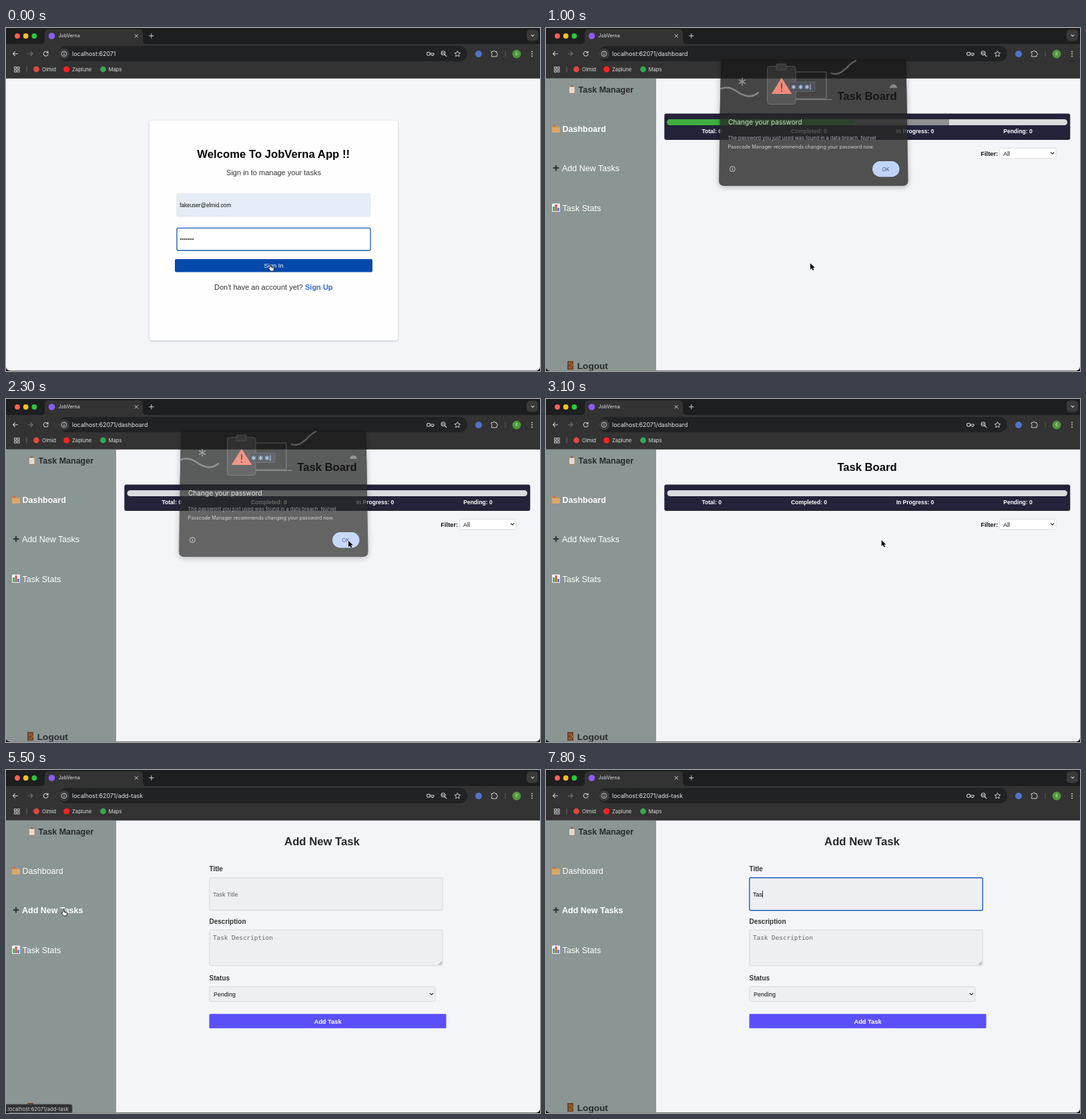
Animation of 800x515 px, one loop 8 s. Source, as an HTML page:

```html
<!DOCTYPE html>
<html lang="en">
<head>
<meta charset="utf-8">
<title>JobVerna</title>
<style>
html, body { margin: 0; width: 100%; height: 100%; overflow: hidden; background: #000; }
svg { display: block; width: 800px; height: 515px; }
text { font-family: "Liberation Sans", Arial, sans-serif; white-space: pre; }
.ui { font-family: Inter, Roboto, sans-serif; }
.mono { font-family: "DejaVu Sans Mono", monospace; }
.b { font-weight: 700; }
.m { text-anchor: middle; }
.card { filter: drop-shadow(0 1px 1.5px rgba(0,0,0,.22)); }
.dialog { filter: drop-shadow(0 2px 4px rgba(0,0,0,.35)); }
</style>
</head>
<body>
<svg id="stage" viewBox="0 0 800 515"></svg>
<script>
// Drawing helpers: each returns SVG markup
const text = (x, cy, str, size, fill, cls = '', id = '') =>
  `<text ${id && `id="${id}"`} class="${cls}" x="${x}" y="${cy + size * 0.36}" font-size="${size}" fill="${fill}">${str}</text>`;
const rect = (x, y, w, h, fill, r = 0, extra = '') =>
  `<rect x="${x}" y="${y}" width="${w}" height="${h}" rx="${r}" fill="${fill}" ${extra}/>`;
const dot = (x, y, r, fill, extra = '') => `<circle cx="${x}" cy="${y}" r="${r}" fill="${fill}" ${extra}/>`;
const line = (d, color, w = 1, extra = '') =>
  `<path d="${d}" fill="none" stroke="${color}" stroke-width="${w}" stroke-linecap="round" stroke-linejoin="round" ${extra}/>`;
const shape = (d, fill, extra = '') => `<path d="${d}" fill="${fill}" ${extra}/>`;
const group = (id, ...parts) => `<g id="${id}">${parts.join('')}</g>`;
const stroke = (c, w = 1) => `stroke="${c}" stroke-width="${w}"`;
const chevron = (x, y, c = '#222', s = 2.3) => line(`M${x - s} ${y - s / 2}l${s} ${s}l${s} ${-s}`, c, 1.1);

function browser() {
  const ink = '#d0d0d0';
  const apps = [0, 1, 2, 3].map(i =>
    rect(12.5 + i % 2 * 4.6, 58.5 + (i >> 1) * 4.6, 3, 3, 'none', 0, stroke(ink, .9)));
  return group('browser',
    rect(0, 0, 800, 75.5, '#333'), rect(0, 0, 800, 24, '#1d1e1f'),
    shape('M52 24q6 0 6-6V8q0-6 6-6H199q6 0 6 6V18q0 6 6 6Z', '#333'),
    dot(17, 12, 3.9, '#fe5f57'), dot(29.7, 12, 3.9, '#febc2e'), dot(42.3, 12, 3.9, '#28c840'),
    dot(68.5, 12, 4.8, '#8b5cf6'),
    text(78.5, 11.5, 'JobVerna', 7.2, '#e6e6e6', 'ui'),
    line('M193 9.5l4.6 4.6m0-4.6l-4.6 4.6', ink), line('M214.5 11.8h6.6m-3.3-3.3v6.6', ink),
    rect(780, 2.5, 17, 17, '#3a3a3a', 5), chevron(789, 11.4, ink, 2),
    line('M17.5 38.7h-7m3-3l-3 3l3 3', ink, 1.1), line('M33 38.7h7m-3-3l3 3l-3 3', '#777', 1.1),
    line('M62.4 36.6a3.4 3.4 0 1 0 .6 2.8M63 35v2.2h-2.4', ink, 1.1),
    rect(79, 27, 612, 23, '#212223', 11.5), dot(87, 38.7, 8, '#3a3b3c'),
    dot(87, 38.7, 3.8, 'none', stroke(ink, .9)), line('M87 38.3v2.2M87 36.7v.1', ink),
    text(99, 38.6, '', 8.9, '#e6e6e6', 'ui', 'url'),
    dot(633, 38.8, 2.5, 'none', stroke(ink, 1.1)), line('M635.6 38h5.6v2h-1.2v1.4h-2v-1.4h-2.4', ink),
    dot(655, 37.6, 2.9, 'none', stroke(ink, 1.1)), line('M657.3 40l2.6 2.6M653.8 37.6h2.4', ink, 1.1),
    shape('M676.4 34.4l1.3 2.8 3 .4-2.2 2.1.5 3-2.6-1.5-2.7 1.5.5-3-2.1-2.1 3-.4Z', 'none', stroke(ink, 1)),
    dot(708, 39, 5, '#4f74c9'),
    line('M727.5 35.5h2.2a1.5 1.5 0 0 1 3 0h2.4v2.4a1.4 1.4 0 0 1 0 2.8v2.2h-7.6v-2.4a1.4 1.4 0 0 0 0-2.6Z', ink, 1),
    line('M748 35v8', '#666', .8), dot(765, 39, 6.4, '#4d9a3a'), text(765, 39, '6', 5.5, '#e8f5e4', 'ui m'),
    dot(788, 35.4, 1, ink), dot(788, 38.8, 1, ink), dot(788, 42.2, 1, ink),
    ...apps, line('M31 58v8', '#777', .8),
    dot(45.5, 62, 4.4, '#e2483d'), text(54, 62, 'Olmid', 7.7, '#dcdcdc', 'ui'),
    dot(90.8, 62, 4.6, '#f22'), text(99, 62, 'Zaplune', 7.7, '#dcdcdc', 'ui'),
    dot(145.5, 62, 4.4, '#35a853'), text(153.5, 62, 'Maps', 7.7, '#dcdcdc', 'ui'));
}

function login() {
  return group('login',
    rect(0, 75.5, 800, 440, '#f3f5f8'),
    rect(215, 139, 372, 330, '#fefefe', 4, 'class="card"'),
    text(400.7, 189, 'Welcome To JobVerna App !!', 16.7, '#050505', 'b m'),
    text(401, 217, 'Sign in to manage your tasks', 11, '#333', 'm'),
    rect(255.8, 248.7, 290, 34.3, '#e5ecf7', 2, stroke('#dbe1ea', .8)),
    text(260.2, 265.7, 'fakeuser@elmid.com', 8.2, '#111'),
    rect(256, 300.4, 290, 33.6, '#fff', 2, stroke('#ddd', .8)),
    rect(256, 300.4, 290, 33.6, 'none', 2, `id="ring" ${stroke('#1b5fb8', 1.3)}`),
    ...[0, 1, 2, 3, 4, 5, 6].map(i => dot(262 + i * 3, 317, 1.1, '#111')),
    rect(253, 347, 296, 19.4, '#0549ab', 2), text(401, 356.8, 'Sign In', 9.4, '#fff', 'm'),
    text(312, 389, "Don't have an account yet?", 11, '#333'), text(448, 389, 'Sign Up', 11, '#2f66dc', 'b'));
}

function sidebar() {
  return group('sidebar',
    rect(0, 75.5, 800, 440, '#f4f5f8'), rect(0, 75.5, 165, 440, '#8b9594'),
    rect(34, 87, 9.6, 11.4, '#b98a5c', 1), rect(35.2, 88.6, 7.2, 8.8, '#eee'),
    rect(36.6, 85.8, 4.4, 2.6, '#777', .8), line('M36.6 91h4.4m-4.4 2h4.4m-4.4 2h4.4', '#aaa', .6),
    text(48.6, 92.4, 'Task Manager', 12.5, '#262a2b', 'b'),
    rect(9, 147, 12, 10, '#dca766', 1), shape('M9 149V146h4l1 1.4h7V149Z', '#c08a50'),
    rect(11, 145.4, 3, 1.6, '#d9534f'), rect(16, 145.8, 3.5, 1.4, '#5aa0d0'),
    text(24.5, 151.6, 'Dashboard', 12.5, '#fff', '', 'navBoard'),
    line('M15 206v8.4m-4.2-4.2h8.4', '#33393b', 2.2, 'style="stroke-linecap:butt"'),
    text(24, 210.7, 'Add New Tasks', 12.5, '#fff', '', 'navAdd'),
    rect(9, 263.5, 12, 12.5, '#eef2f2', 1), rect(10.3, 268, 2.7, 7, '#3aa655'),
    rect(13.7, 265, 2.7, 10, '#d64541'), rect(17.1, 270, 2.7, 5, '#3b7dd8'),
    text(24.5, 270, 'Task Stats', 12.5, '#fff'),
    rect(32, 500, 9, 13, '#6d3f22', .5), rect(33.6, 501.6, 5.8, 4.2, '#8f5833'),
    rect(33.6, 507.2, 5.8, 4.6, '#8f5833'), dot(39.6, 506.5, .7, '#e3b44b'),
    text(46.8, 507, 'Logout', 13.6, '#262a2b', 'b'));
}

function taskCard(x, y, title, note, done) {
  const tools = ['#5246c9', '#ef5a48', '#37b34a'].map((c, i) => rect(x + 100 + i * 14.6, y + 126, 12.4, 11, c, 1));
  return rect(x, y, 159, 148, '#fff', 4, 'class="card"') +
    rect(x + 8.7, y + 8, 142, 60, done ? '#cbf5c8' : '#d8d8d8', 3) +
    text(x + 79.5, y + 38, title, 10.6, done ? '#2e5f22' : '#333', 'b m') +
    text(x + 8.5, y + 80.4, note, 7.6, '#333') +
    rect(x + 8.5, y + 123, 55.5, 14, '#cbf5c8', 5) + text(x + 36.3, y + 130, 'COMPLETED', 5.4, '#2f4a2b', 'b m') +
    tools.join('') +
    line(`M${x + 107} ${y + 129}h-3.4v5.6h5.4v-3M${x + 106} ${y + 132}l3.8-3.8`, '#fff', .9) +
    rect(x + 118.6, y + 130, 4.6, 5, '#fff', .6) + line(`M${x + 117.8} ${y + 128.8}h6.2`, '#fff', .9) +
    dot(x + 135.4, y + 131.5, 3.5, '#fff') + line(`M${x + 133.9} ${y + 131.6}l1.1 1.1l2-2.2`, '#37b34a', .9);
}

function board() {
  const counts = [['Total', 248.3], ['Completed', 394], ['In Progress', 553], ['Pending', 707]];
  return group('board',
    text(481, 102.2, 'Task Board', 16.6, '#0a0a0a', 'b m'),
    rect(177.3, 128.5, 608, 39.5, '#23243a', 3),
    `<clipPath id="track">${rect(181.5, 137, 599.5, 9, '#000', 4.5)}</clipPath><g clip-path="url(#track)">`,
    rect(181, 137, 600, 9, '#d9dcdd'),
    rect(181, 137, 400, 9, '#919191', 0, 'id="barPending"'),
    rect(181, 137, 400, 9, '#3fae3d', 0, 'id="barDone"'), '</g>',
    ...counts.map(([name, x], i) => text(x, 154.6, name, 8.5, '#fff', 'b m', 'count' + i)),
    text(651.3, 188.6, 'Filter:', 9.3, '#111', 'b'),
    rect(679.5, 180.4, 84.5, 15.4, '#fff', 1.5, stroke('#d8d8d8', .8)),
    text(685, 188.3, 'All', 9, '#111'), chevron(758.6, 188),
    group('tasks',
      text(194, 211, 'Completed', 12.2, '#4b3fb5', 'b'), text(194, 415.3, 'Pending', 12.2, '#4b3fb5', 'b'),
      taskCard(190.5, 231, 'Task-2', 'Build a website', true),
      taskCard(357.7, 231, 'Task-3', 'Deploy The app', true),
      taskCard(190.5, 435, 'Task-1', 'This the first task', false)));
}

function form() {
  const edge = stroke('#d3d7dc', .9), bg = '#edeff2';
  return group('form',
    text(473.5, 107.2, 'Add New Task', 16.7, '#25282c', 'b m'),
    text(304.5, 148, 'Title', 10, '#333', 'b'),
    rect(304.8, 161.8, 349.4, 49, bg, 2, `id="field" ${edge}`),
    text(310, 186.4, 'Task Title', 9, '#666', '', 'title'),
    rect(316, 181, .8, 10.5, '#000', 0, 'id="caret"'),
    text(304.5, 227, 'Description', 10, '#333', 'b'),
    rect(304.8, 240.2, 349.4, 53.6, bg, 2, edge),
    text(310, 251.4, 'Task Description', 9.34, '#666', 'mono'),
    line('M648.5 292.3l4.2-4.2m-1.7 4.2l1.7-1.7', '#555', .7),
    text(304.5, 312, 'Status', 10, '#333', 'b'),
    rect(304.8, 325.2, 338, 22.4, bg, 2, edge),
    text(311, 336.6, 'Pending', 9, '#111'), chevron(637.5, 336.5),
    rect(304.5, 366.3, 355, 21.5, '#5b4ff7', 1.5), text(482, 377.3, 'Add Task', 9.3, '#fff', 'b m'));
}

function dialog() {
  const grey = '#6b6b6b';
  const star = (x, y, r, c, w) => [0, 60, 120].map(a =>
    line(`M${x} ${y - r}v${2 * r}`, c, w, `transform="rotate(${a} ${x} ${y})"`)).join('');
  return `<g id="dialog" class="dialog">` +
    shape('', '#282828', 'id="sheet"') + shape('', '#1a1a1a', 'id="banner"') +
    line('M262 91q12-4 22 3t17 8q9 2 17-5', grey, 2.4) + line('M428 68q8 3 16-3t10-9q4-4 10-7', grey, 2.4) +
    star(294, 80.5, 5, '#777', 1.8) + shape('M515 90a5.5 5.5 0 0 1 11 0Z', grey) +
    rect(366, 66, 54, 40, 'none', 1, stroke('#666')) + line('M362 107.3h66', '#777', 1) +
    rect(331.5, 57.5, 42.5, 57, '#303030', 4, stroke('#555')) + rect(345, 54, 15, 9, '#3a3a3a', 2, stroke('#555')) +
    rect(364, 81, 39, 14.5, '#262a33', 1, stroke('#3d4657', .8)) +
    [371, 381.5, 391].map(x => star(x, 88.5, 3, '#a8c7fa', 1.2)).join('') + line('M396 85v7.5', '#a8c7fa', 1) +
    shape('M353 75.5L367.5 98.5H338.5Z', '#f0705a', stroke('#f0705a', 1)) +
    line('M353 83.5v7', '#302020', 1.8) + dot(353, 94.6, 1.1, '#302020') +
    text(273, 141.6, 'Change your password', 10.1, '#e8eae8', 'ui') +
    text(272.5, 165.4, 'The password you just used was found in a data breach. Nurvel', 7.4, '#c6c6c6', 'ui') +
    text(272.5, 178, 'Passcode Manager recommends changing your password now.', 7.3, '#c6c6c6', 'ui') +
    dot(279.3, 211.7, 4, 'none', stroke('#ccc', .9)) + line('M279.3 211.3v2.3m0-4v.1', '#ccc') +
    rect(489, 200, 40.5, 23.4, '#b4ccfa', 11.7) + text(509, 212, 'OK', 8, '#173768', 'ui m') + '</g>';
}

function pointers() {
  return group('arrow',
      shape('M0 0V9.2L2.2 7.2 3.7 10.6 5.3 9.9 3.8 6.6 6.8 6.5Z', '#000', stroke('#fff', .8) + ' paint-order="stroke"')) +
    group('hand',
      shape('M-1.2 1q1-1 1.8 0V4.6l4 .8q1.2.4 1 1.8l-.8 3.8H.4L-3 7q-.4-1.4.8-1.2l1 .8Z', '#fff', stroke('#111', .9)),
      line('M2 5v1.6M3.6 5.3v1.6', '#111', .6)) +
    group('beam', line('M-2-5q1.6 0 2 1q.4-1 2-1M0-4V4M-2 5q1.6 0 2-1q.4 1 2 1M-1 1.4h2', '#222', 1));
}

const bubble = () => group('bubble',
  shape('M0 502H96q3 0 3 3V515H0Z', '#303236', stroke('#4a4c50', .7)),
  text(3, 508.8, 'localhost:62071/add-task', 7.6, '#cfd1d4', 'ui'));

document.getElementById('stage').innerHTML =
  `<clipPath id="win">${rect(0, -10, 800, 524.5, '#000', 6)}</clipPath><g clip-path="url(#win)">` +
  login() + sidebar() + board() + form() + browser() + bubble() + dialog() + '</g>' +
  group('cursor', pointers());

// Timing tables: [ms, value...]
const LOOP = 8000, STEP = 100;
const T = { board: 700, cleared: 900, form: 5500, focus: 6800, typing: 7200 };
const path = [[0, 396, 354], [1600, 396, 353], [2100, 513, 213], [3000, 513, 213], [3900, 211, 180.5],
  [4100, 211, 180.5], [4700, 130, 172], [4800, 130, 172], [5300, 86, 208], [5800, 86, 208],
  [6200, 342, 175], [6700, 346, 183]];
const kinds = [[0, 'hand'], [700, 'arrow'], [5100, 'hand'], [5900, 'arrow'], [6200, 'beam'], [7200, '']];
const typed = [[0, 'Task Title'], [7200, 'T'], [7500, 'Ta'], [7800, 'Tas']];
const sheetFade = [[800, 0], [900, .3], [1000, .8], [1100, 1], [2200, 1], [2300, .7], [2400, 0]];
const bubbleFade = [[5400, 0], [5500, 1], [6300, 1], [6500, 0]];
const ringFade = [[0, 1], [200, 0]];
const drain = [[900, 1], [1000, .705], [1100, .317], [1200, .115], [1300, .024], [1400, 0]];

const $ = id => document.getElementById(id);
const set = (id, name, value) => $(id).setAttribute(name, value);
const show = (id, on) => { $(id).style.display = on ? '' : 'none'; };
const held = (table, t) => table.filter(row => row[0] <= t).pop()[1];
const linear = u => u, smooth = u => u * u * (3 - 2 * u);

function at(table, t, col = 1, ease = linear) {
  const i = table.findIndex(row => row[0] > t);
  if (i < 0) return table[table.length - 1][col];
  if (i === 0) return table[0][col];
  const a = table[i - 1], b = table[i];
  return a[col] + (b[col] - a[col]) * ease((t - a[0]) / (b[0] - a[0]));
}

function drawSheet(alpha) {
  show('dialog', alpha > 0);
  $('dialog').style.opacity = alpha;
  const inset = alpha < 1 ? 3 : 0, l = 259 + inset, r = 542.5 - inset;
  set('sheet', 'd', `M${l} 52q0-5 5-5H${r - 5}q5 0 5 5L542.5 229q0 8-8 8H267q-8 0-8-8Z`);
  set('banner', 'd', `M${l} 52q0-5 5-5H${r - 5}q5 0 5 5L${r + inset / 2} 130H${l - inset / 2}Z`);
}

function render(t) {
  const onBoard = t >= T.board && t < T.form, onForm = t >= T.form;
  show('login', t < T.board);
  show('sidebar', t >= T.board);
  show('board', onBoard);
  show('form', onForm);
  $('url').textContent = 'localhost:62071' + (onForm ? '/add-task' : onBoard ? '/dashboard' : '');
  set('navBoard', 'class', onBoard ? 'b' : '');
  set('navAdd', 'class', onForm ? 'b' : '');
  set('ring', 'opacity', at(ringFade, t));

  const full = t < T.cleared, left = at(drain, t);
  show('tasks', full);
  ['Total: 3', 'Completed: 2', 'In Progress: 0', 'Pending: 1'].forEach((label, i) => {
    $('count' + i).textContent = full ? label : label.replace(/\d/, 0);
  });
  set('barDone', 'width', 400 * left);
  set('barPending', 'width', 600 * left);
  drawSheet(at(sheetFade, t));

  const focus = t >= T.focus, typing = t >= T.typing;
  set('field', 'stroke', focus ? '#1b5fb8' : '#d3d7dc');
  set('field', 'stroke-width', focus ? 1.4 : .9);
  $('title').textContent = held(typed, t);
  set('title', 'fill', typing ? '#000' : '#666');
  show('caret', focus);
  if (focus) set('caret', 'x', 310 + (typing ? $('title').getComputedTextLength() : 0));

  show('bubble', at(bubbleFade, t) > 0);
  set('bubble', 'opacity', at(bubbleFade, t));
  const kind = held(kinds, t);
  ['arrow', 'hand', 'beam'].forEach(k => show(k, k === kind));
  set('cursor', 'transform', `translate(${at(path, t, 1, smooth)} ${at(path, t, 2, smooth)})`);
}

const start = performance.now();
function tick() {
  const t = (performance.now() - start) % LOOP;
  render(Math.floor(t / STEP) * STEP);
  requestAnimationFrame(tick);
}
tick();
</script>
</body>
</html>
```
